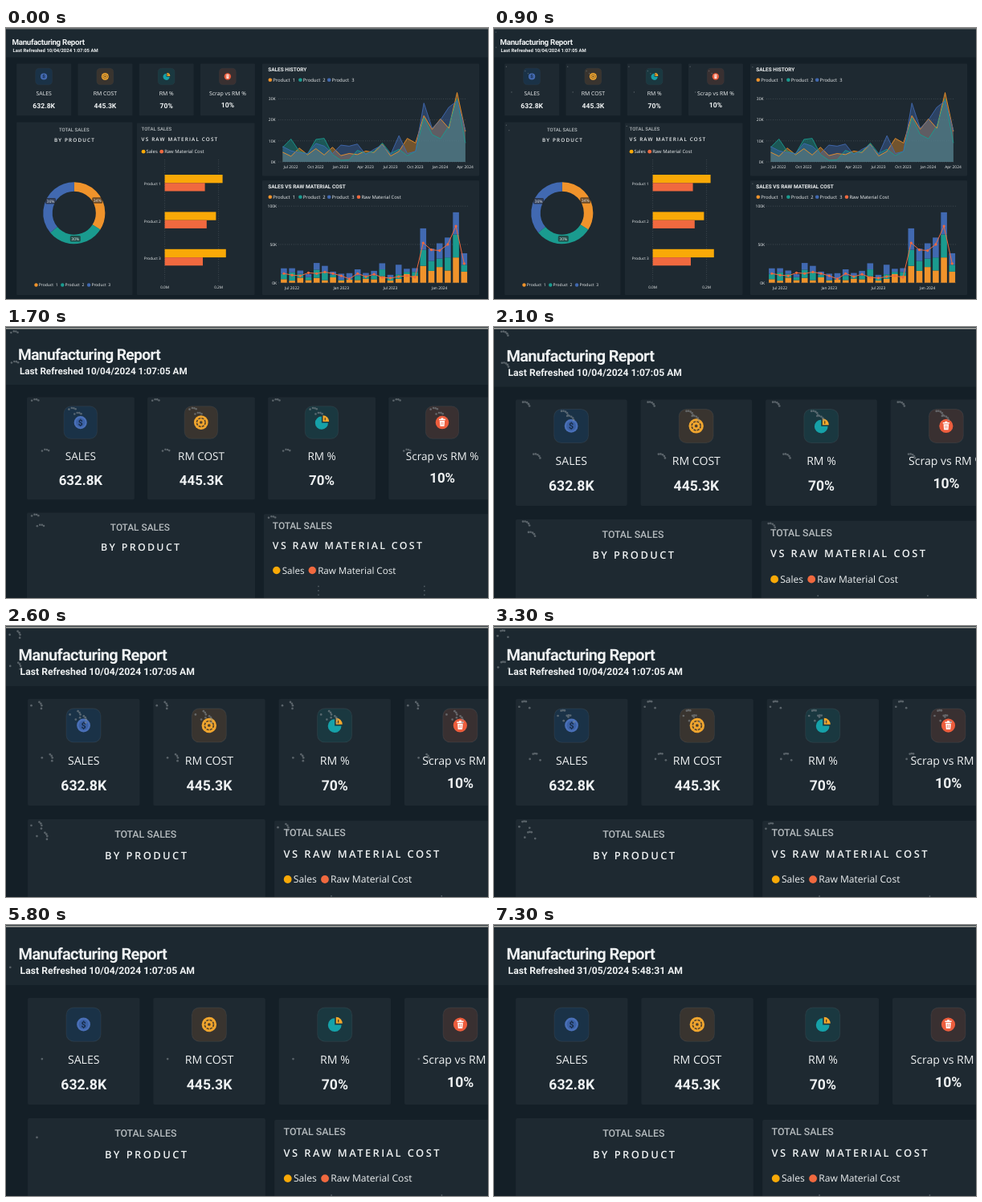
Animation, 600 px wide and 338 px high, one loop 7.4 s. Source, as an HTML page:

```html
<!DOCTYPE html>
<html lang="en">
<head>
<meta charset="utf-8">
<title>Manufacturing Report</title>
<style>
  html, body { margin: 0; width: 100%; height: 100%; overflow: hidden; background: #141f27; }
  svg { display: block; width: 100vw; height: 100vh; }
  text { font-family: "Open Sans", "Noto Sans", sans-serif; font-weight: 500; fill: #eef1f2; text-rendering: geometricPrecision; white-space: pre; }
  .din { font-family: Roboto, "Liberation Sans", sans-serif; }
  .bold { font-weight: 700; }
  .title { font-weight: 600; letter-spacing: -.32px; }
  .light { font-weight: 400; }
  .grey { fill: #b4babd; }
  .spaced { font-weight: 600; letter-spacing: 1.18px; }
</style>
</head>
<body>
<svg viewBox="0 0 600 338"><g id="scene"></g></svg>
<script>
const LOOP = 7400, STEP = 100;
const ZOOM = { start: 1037, rate: 6.34, scale: 2.05 };
const SPIN = { start: 800, period: 4950, delay: 240, radius: 3.2 };
const REFRESHED_AT = 6600;
const ORANGE = '#f0932b', TEAL = '#1a9b8f', BLUE = '#4169b1', AMBER = '#f9a907', RED = '#f0693f';
const PANEL = '#1e2931', GRID = '#5d676e';
const scene = document.getElementById('scene');

function add(tag, attrs, parent = scene) {
  const node = document.createElementNS('http://www.w3.org/2000/svg', tag);
  for (const key in attrs) node.setAttribute(key, attrs[key]);
  return parent.appendChild(node);
}
const rect = (x, y, width, height, fill, more) => add('rect', { x, y, width, height, fill, ...more });
const circle = (cx, cy, r, fill, more) => add('circle', { cx, cy, r, fill, ...more });
const path = (d, more) => add('path', { d, fill: 'none', ...more });
const dotted = d => path(d, { stroke: GRID, 'stroke-width': .7, 'stroke-dasharray': '.7 2' });
function text(x, y, size, content, style = '', anchor = 'start') {
  const node = add('text', { x, y, 'font-size': size, class: style, 'text-anchor': anchor });
  node.textContent = content;
  return node;
}
function legend(y, size, r, items) {
  for (const [x, color, label] of items) {
    circle(x, y, r, color);
    text(x + r + 1.1, y + size * .36, size, label);
  }
}

// Header
rect(0, 0, 600, 338, '#141f27');
rect(0, 0, 600, 36.6, '#1c2830');
rect(0, .4, 600, .9, '#a3a39f');
text(7.6, 21, 9.75, 'Manufacturing Report', 'din title');
const refreshed = text(8.6, 29.8, 5.94, '', 'din bold');

// Key figures
const CARD_PITCH = 76.25;
const cards = [
  ['SALES', '632.8K', '#1a3247'],
  ['RM COST', '445.3K', '#39342f'],
  ['RM %', '70%', '#1a3840'],
  ['Scrap vs RM %', '10%', '#393031']
];
cards.forEach(([label, value, tint], i) => {
  const x = 13.2 + i * CARD_PITCH, cx = x + 34;
  rect(x, 44.4, 68, 64.9, PANEL, { rx: 1 });
  rect(cx - 10.6, 50.2, 21, 20.6, tint, { rx: 4.5, stroke: '#ffffff', 'stroke-opacity': .06, 'stroke-width': .5 });
  text(cx, 84.2, 6.9, label, 'light', 'middle');
  text(cx, i < 3 ? 100.2 : 98.6, 8.6, value, 'din bold', 'middle');
});
const iconX = i => 47.1 + i * CARD_PITCH, ICON_Y = 60.5;

circle(iconX(0), ICON_Y, 4.1, '#4a70b8');
circle(iconX(0), ICON_Y, 2.9, '#3b61a5');
text(iconX(0), ICON_Y + 1.9, 5.2, '$', 'din bold', 'middle').style.fill = '#172b45';

circle(iconX(1), ICON_Y, 4.5, '#f0a52e');
circle(iconX(1), ICON_Y, 2.7, 'none', { stroke: '#51412c', 'stroke-width': .8, 'stroke-dasharray': '1.5 .62' });
circle(iconX(1), ICON_Y, .9, '#51412c');

path(`M${iconX(2)} ${ICON_Y + .2}v-4a4.1 4.1 0 1 0 4.1 4z`, { fill: '#16a1a8' });
path(`M${iconX(2) + .8} ${ICON_Y - .6}v-3.9a3.9 3.9 0 0 1 3.9 3.9z`, { fill: '#f5a82c' });
rect(iconX(2) + 1.9, ICON_Y - 3, .6, 1.7, '#4b3b20');

circle(iconX(3), ICON_Y, 4.2, '#ed5d3d');
path(`M${iconX(3) - 2} ${ICON_Y - 1.8}h4M${iconX(3) - .7} ${ICON_Y - 2.5}h1.4`, { stroke: '#fff', 'stroke-width': .7 });
path(`M${iconX(3) - 1.6} ${ICON_Y - 1.1}h3.2l-.3 3.5h-2.6z`, { fill: '#fff' });
path(`M${iconX(3) - .5} ${ICON_Y - .4}v2M${iconX(3) + .5} ${ICON_Y - .4}v2`, { stroke: '#ed5d3d', 'stroke-width': .35 });

// Panels
rect(13.2, 117.6, 144.3, 215.4, PANEL, { rx: 1 });
rect(163, 118.5, 146.5, 214.5, PANEL, { rx: 1 });
rect(319, 44.4, 270, 140.2, PANEL, { rx: 1 });
rect(319, 190.3, 270, 142.7, PANEL, { rx: 1 });

// Share by product
text(84.8, 129, 6.05, 'TOTAL SALES', 'din grey', 'middle');
text(60, 141.8, 6.3, 'BY PRODUCT', 'spaced');
const shares = [[.34, ORANGE, 113.7, 215], [.30, TEAL, 86.3, 262.8], [.36, BLUE, 55.5, 215.8]];
const ringLength = 2 * Math.PI * 32.8;
let shareStart = 0;
for (const [share, color] of shares) {
  circle(84.8, 230.7, 32.8, 'none', {
    stroke: color, 'stroke-width': 11.5,
    'stroke-dasharray': `${share * ringLength} ${ringLength}`,
    transform: `rotate(${shareStart * 360 - 90} 84.8 230.7)`
  });
  shareStart += share;
}
for (const [share, , x, y] of shares) {
  rect(x - 6.5, y - 3.7, 13, 7.4, '#252423', { rx: 1.5, opacity: .65 });
  text(x, y + 1.9, 5.1, Math.round(share * 100) + '%', '', 'middle');
}
const products = [[ORANGE, 'Product  1'], [TEAL, 'Product  2'], [BLUE, 'Product  3']];
legend(320.5, 5, 2.2, products.map((p, i) => [37.5 + i * 32.8, ...p]));

// Sales against cost, per product
text(168.6, 128, 6.05, 'TOTAL SALES', 'din grey');
text(168.6, 140.9, 6.3, 'VS RAW MATERIAL COST', 'spaced');
legend(154.2, 5.9, 2.4, [[171.1, AMBER, 'Sales'], [193.7, RED, 'Raw Material Cost']]);
dotted('M197.6 164V317M264.6 164V317');
[[72, 50], [63.8, 52.2], [76.2, 47.4]].forEach(([sales, cost], i) => {
  const y = 183 + i * 46.4;
  rect(197.6, y, sales, 10.3, AMBER);
  rect(197.6, y + 10.3, cost, 10.2, RED);
  text(192.7, y + 13.2, 4.7, `Product ${i + 1}`, '', 'end');
});
text(197.6, 325.4, 4.7, '0.0M', '', 'middle');
text(264.6, 325.4, 4.7, '0.2M', '', 'middle');

// Monthly sales in thousands, June 2022 to April 2024
const sales = [
  [4.6, 2.7, 6.6, 3.4, 6.3, 3.3, 7, 3, 4, 3.5, 5.2, 4.5, 8.4, 2.8, 5, 11.2, 9, 22, 15.5, 20.5, 16, 33, 14.5],
  [6.9, 10.9, 5, 3.8, 10.7, 11.2, 3.5, .8, 1, 5.5, 4, 5, 9, 4, 6, 3, 5, 21, 13, 11, 17, 30, 9],
  [7.3, 5.3, 4.3, 4, 8.8, 7.5, 4, 8, 7.5, 8.5, 3.5, 6, 8, 3.5, 12.5, 4, 5, 28, 16, 20, 26, 29, 15]
];
const cost = [12, 10, 9, 13, 12, 14, 12, 9, 5, 12, 8, 11, 7, 6, 8, 9, 7, 52, 43, 42, 50, 74, 25];

text(326.2, 53.6, 6.5, 'SALES HISTORY', 'din bold');
legend(64.8, 5.9, 2.3, products.map((p, i) => [[328.8, 366.4, 402.2][i], ...p]));
for (let k = 0; k <= 30; k += 10) {
  const y = 167 - k * 2.62;
  dotted(`M339 ${y}H573`);
  text(335.6, y + 1.8, 5, k + 'K', '', 'end');
}
const polyline = values => 'M' + values.map((v, i) => `${344.4 + i * 10.34} ${167 - v * 2.62}`).join('L');
sales.forEach((values, i) => path(polyline(values) + 'V167H344.4Z', { fill: products[i][0], opacity: .4 }));
sales.forEach((values, i) => path(polyline(values), { stroke: products[i][0], 'stroke-width': .9 }));
['Jul 2022', 'Oct 2022', 'Jan 2023', 'Apr 2023', 'Jul 2023', 'Oct 2023', 'Jan 2024', 'Apr 2024']
  .forEach((label, i) => text(354.5 + i * 31, 175, 4.9, label, '', 'middle'));

text(326.2, 199.6, 6.5, 'SALES VS RAW MATERIAL COST', 'din bold');
legend(210.8, 5.9, 2.3, [
  ...products.map((p, i) => [[328.8, 366.4, 402.2][i], ...p]), [439, RED, 'Raw Material Cost']
]);
const barX = i => 345.9 + i * 10.2, barY = k => 317.7 - k * .955;
for (const k of [0, 50, 100]) {
  dotted(`M339 ${barY(k)}H576`);
  text(337.2, barY(k) + 1.8, 5, k + 'K', '', 'end');
}
cost.forEach((_, i) => {
  let total = 0;
  sales.forEach((values, p) => {
    total += values[i];
    rect(barX(i) - 3.8, barY(total), 7.6, values[i] * .955, products[p][0]);
  });
});
path('M' + cost.map((v, i) => `${barX(i)} ${barY(v)}`).join('L'), { stroke: RED, 'stroke-width': 1 });
cost.forEach((v, i) => circle(barX(i), barY(v), 1.6, RED));
['Jul 2022', 'Jan 2023', 'Jul 2023', 'Jan 2024']
  .forEach((label, i) => text(356 + i * 61.2, 326, 4.9, label, '', 'middle'));

// Loading rings: the early group finishes before the late one
const perCard = (x, y) => cards.map((_, i) => [x + i * CARD_PITCH, y]);
const ringGroups = [
  { until: 4850, centres: [[5.4, 5.9], ...perCard(18.5, 49), ...perCard(42, 54.5), ...perCard(45.5, 57.5),
    [18.5, 122], [168.3, 123.2], [325, 49.5], [325, 195]] },
  { until: 6400, centres: [[5.7, 25], ...perCard(25, 80.8), [21.9, 128.5]] }
];
for (const group of ringGroups) {
  group.node = add('g', { fill: '#838b90', opacity: .6 });
  group.dots = group.centres.flatMap(([x, y]) => [0, 1, 2, 3, 4].map(order =>
    ({ x, y, order, node: add('circle', { r: .65 }, group.node) })));
}

const easeOut = u => 1 - (1 - u) ** 2, easeInOut = u => u * u * (3 - 2 * u), linear = u => u;
const orbit = [
  [0, 225, easeOut], [.07, 345, linear], [.30, 455, easeInOut],
  [.39, 690, linear], [.70, 815, easeOut], [.75, 945]
];
// Angle clockwise from the top, or null while the dot is hidden
function orbitAngle(time) {
  if (time < 0) return null;
  const phase = time % SPIN.period / SPIN.period;
  const k = orbit.findIndex(([at]) => at > phase);
  if (k < 0) return null;
  const [from, a, ease] = orbit[k - 1], [to, b] = orbit[k];
  return a + (b - a) * ease((phase - from) / (to - from));
}

function draw(t) {
  const s = Math.max(0, t - ZOOM.start) / 1000 * ZOOM.rate;
  const zoomed = 1 - (1 + s) * Math.exp(-s);
  scene.setAttribute('transform', `scale(${1 + (ZOOM.scale - 1) * zoomed})`);
  refreshed.textContent = 'Last Refreshed ' + (t < REFRESHED_AT ? '10/04/2024 1:07:05 AM' : '31/05/2024 5:48:31 AM');

  for (const { node, dots, until } of ringGroups) {
    node.setAttribute('display', t < until ? 'inline' : 'none');
    for (const dot of dots) {
      const angle = orbitAngle(t - SPIN.start - dot.order * SPIN.delay);
      dot.node.setAttribute('display', angle === null ? 'none' : 'inline');
      if (angle === null) continue;
      const a = angle * Math.PI / 180;
      dot.node.setAttribute('cx', dot.x + SPIN.radius * Math.sin(a));
      dot.node.setAttribute('cy', dot.y - SPIN.radius * Math.cos(a));
    }
  }
}

function frame() {
  draw(Math.floor(performance.now() % LOOP / STEP) * STEP);
  requestAnimationFrame(frame);
}
frame();
</script>
</body>
</html>
```
